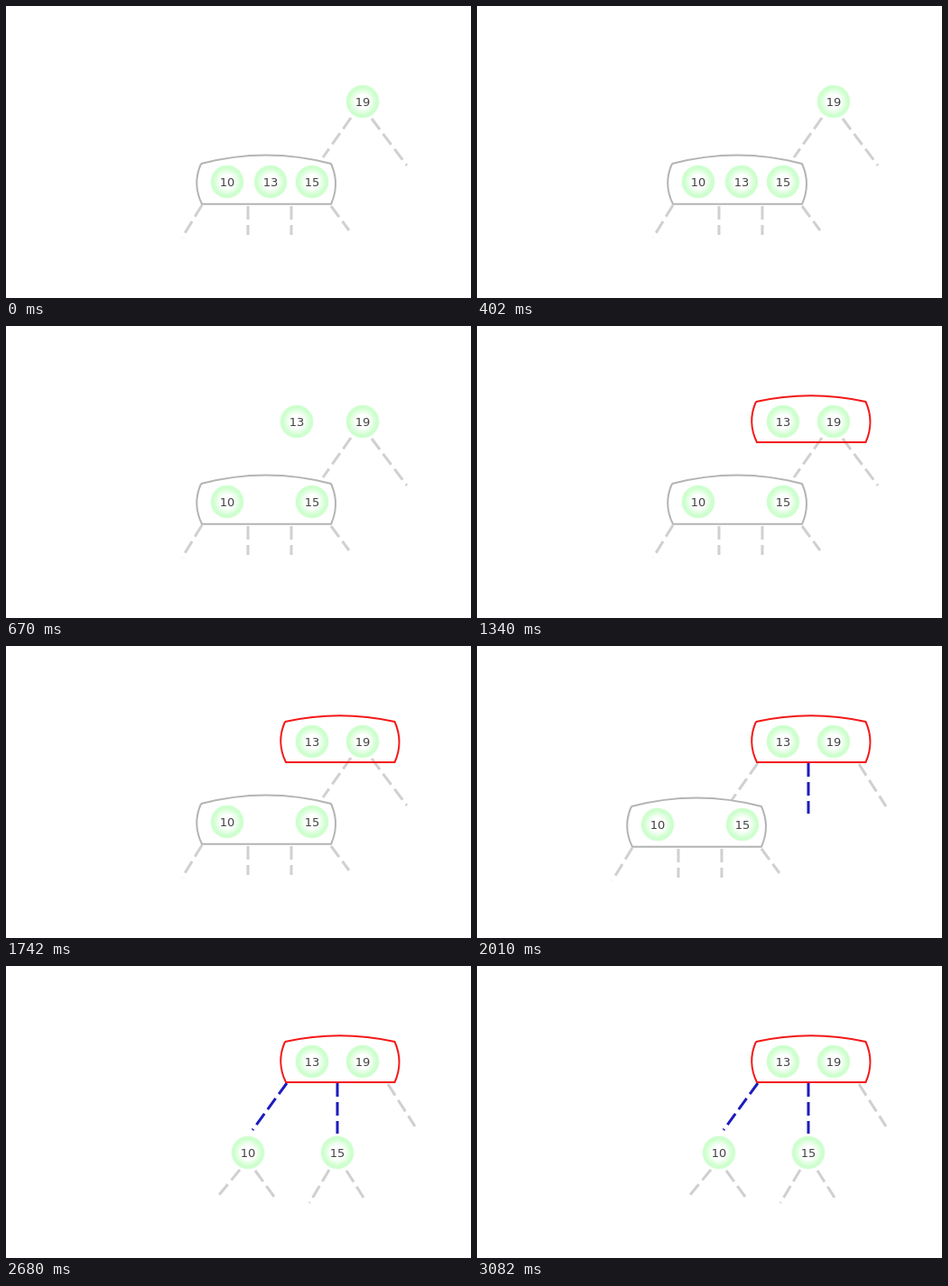
These frames come from a looping animation (515 px wide and 324 px high, 3.35 s). An HTML page with a canvas:

```html
<!DOCTYPE html>
<html>
<head>
<meta charset="utf-8">
<style>
html, body { margin: 0; height: 100%; overflow: hidden; background: #fff; }
canvas { display: block; }
</style>
</head>
<body>
<canvas id="stage" width="515" height="324"></canvas>
<script>
const ctx = document.getElementById('stage').getContext('2d');
const STEP = 670, GRAY = '#d0d0d0', BLUE = '#1c1cbe', RED = '#f41818';

function link(x1, y1, x2, y2, color = GRAY) {
  ctx.strokeStyle = color;
  ctx.lineWidth = 3;
  ctx.setLineDash([15, 6]);
  ctx.beginPath();
  ctx.moveTo(x1, y1);
  ctx.lineTo(x2, y2);
  ctx.stroke();
  ctx.setLineDash([]);
}

function key(value, x, y) {
  const glow = ctx.createRadialGradient(x, y, 0, x, y, 18.5);
  glow.addColorStop(0.4, '#fff');
  glow.addColorStop(0.85, '#ccffcc');
  glow.addColorStop(1, '#d2ffd2');
  ctx.fillStyle = glow;
  ctx.beginPath();
  ctx.arc(x, y, 18.3, 0, Math.PI * 2);
  ctx.fill();
  ctx.fillStyle = '#444';
  ctx.font = '13px "DejaVu Sans", sans-serif';
  ctx.textAlign = 'center';
  ctx.fillText(value, x, y + 5);
}

// Box with a domed top and bulging sides
function box(left, right, top, bottom, dome, color) {
  const mid = (top + bottom) / 2;
  ctx.strokeStyle = color;
  ctx.lineWidth = 2;
  ctx.lineJoin = 'round';
  ctx.beginPath();
  ctx.moveTo(left, top);
  ctx.quadraticCurveTo((left + right) / 2, top - 2 * dome, right, top);
  ctx.quadraticCurveTo(right + 10, mid, right, bottom);
  ctx.lineTo(left + 1, bottom);
  ctx.quadraticCurveTo(left - 10, mid, left, top);
  ctx.stroke();
}

function lowerNode(dx, dy, full) {
  ctx.save();
  ctx.translate(dx, dy);
  link(217, 221, 195, 257);
  link(268, 222, 268, 254);
  link(316, 222, 316, 254);
  link(360, 222, 380, 249);
  box(216, 360, 175, 219.8, 9.5, '#b4b4b4');
  key(10, 245, 195);
  if (full) key(13, 293, 195);
  key(15, 339, 195);
  ctx.restore();
}

function draw(step) {
  ctx.fillStyle = '#fff';
  ctx.fillRect(0, 0, 515, 324);

  if (step < 3) {
    link(382, 124, 351, 168);
    link(405, 125, 444, 177);
    lowerNode(0, 0, step === 0);
  } else {
    link(423, 131, 453, 178);
    link(367, 130, 367, 186, BLUE);
    if (step === 3) {
      link(311, 130, 282, 171);
      lowerNode(-45, 3, false);
    } else {
      link(311, 130, 273, 182, BLUE);
      link(259, 226, 236, 254);
      link(276, 227, 297, 256);
      link(358, 226, 336, 263);
      link(377, 227, 396, 257);
      key(10, 268, 207);
      key(15, 367, 207);
    }
  }

  if (step > 1) box(309, 430.5, 84, 129, 6.8, RED);
  if (step > 0) key(13, step === 1 ? 322 : 339, 106);
  key(19, 395, 106);
}

const start = performance.now();
function tick() {
  draw(Math.floor((performance.now() - start) / STEP) % 5);
  requestAnimationFrame(tick);
}
tick();
</script>
</body>
</html>
```
